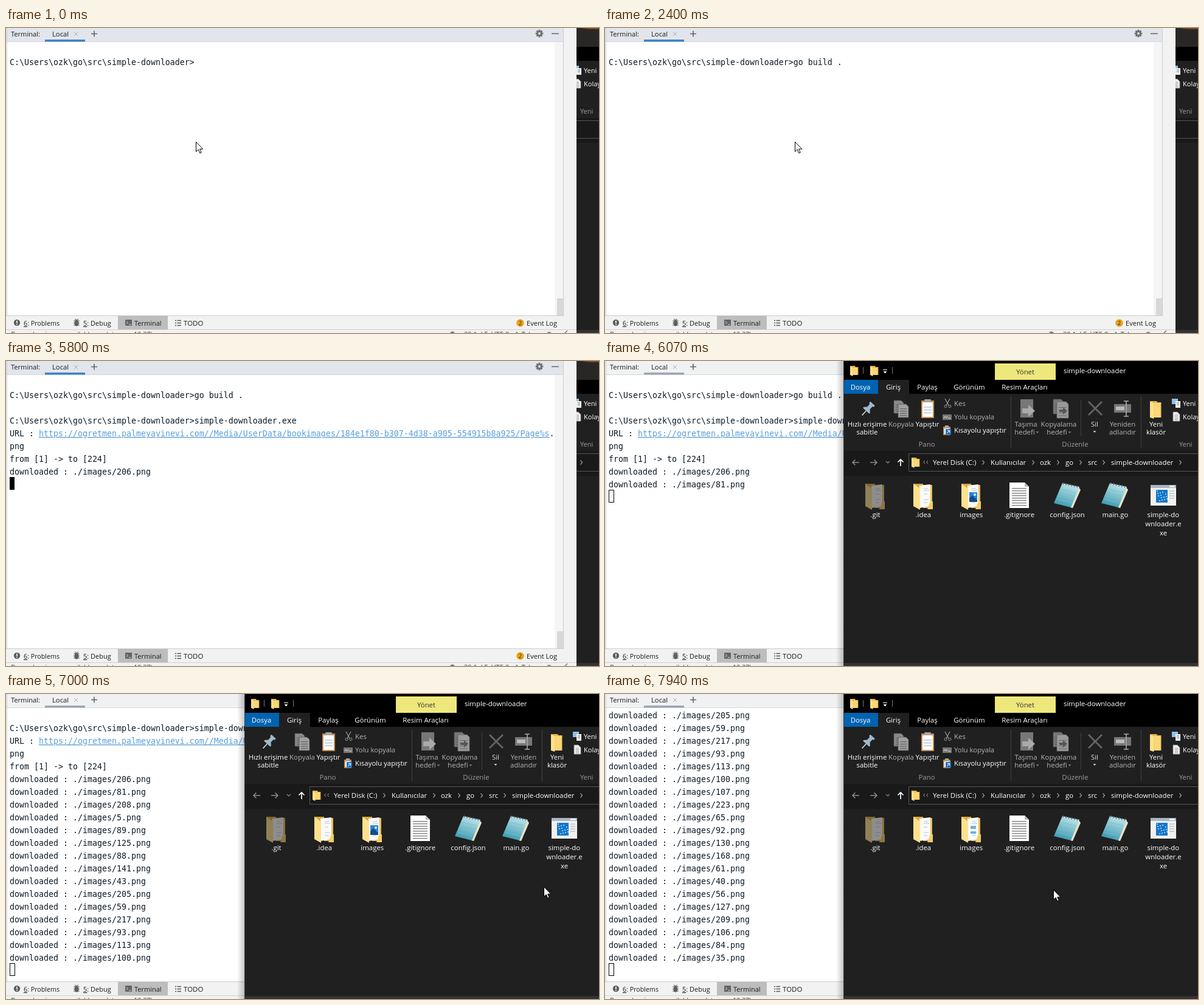
Write an HTML page that moves like this. It is 975 by 502 pixels and loops after 8000 ms.

```html
<!DOCTYPE html>
<html lang="tr">
<head>
<meta charset="utf-8">
<title>Terminal</title>
<style>
html, body { margin: 0; width: 100%; height: 100%; overflow: hidden; background: #fff; }
svg { display: block; width: 975px; height: 502px; }
text { font-family: "Open Sans", "Noto Sans", sans-serif; white-space: pre; }
.term text { font: 13.29px "DejaVu Sans Mono", "Noto Sans Mono", monospace; font-variant-ligatures: none; fill: #0c1b28; }
.link { fill: #5a9fd8; text-decoration: underline; }
.u { text-decoration: underline; }
</style>
</head>
<body>
<svg id="stage" viewBox="0 0 975 502" xmlns="http://www.w3.org/2000/svg"></svg>
<script>
const LOOP = 8000, TICK = 200 / 3, SLACK = 8;
const ROWS = 21, ROW_H = 21, COL_W = 8, TOP = 23, LEFT = 6;
const USER = 'ozk';
const PROMPT = `C:\\Users\\${USER}\\go\\src\\simple-downloader>`;
const LINK = 'https://ogretmen.palmeyayinevi.com//Media/UserData/bookimages/184e1f80-b307-4d38-a905-554915b8a925/Page%s';
const BUILD = 'go build .', RUN = 'simple-downloader.exe';
const IMAGES = [206, 81, 208, 5, 89, 125, 88, 141, 43, 205, 59, 217, 93, 113, 100, 107, 223, 65, 92, 130,
  168, 61, 40, 56, 127, 209, 106, 84, 35];

// Step tables: [time, value]
const BUILD_KEYS = [[0, 0], [70, 1], [140, 2], [200, 4], [270, 5], [400, 6], [800, 7], [1070, 8], [1200, 9], [1270, 10]];
const RUN_KEYS = [[0, 0], [3800, 1], [3870, 2], [4200, 3], [4340, RUN.length]];
const BLINK = [[0, 0], [70, 1], [2400, 0], [2600, 1], [3600, 0], [3800, 1]];
// Linear tables: [time, ...values]
const COUNT = [[6000, 1], [6670, 12], [7400, 20], [7940, 29]];
const POINTER = [[5200, 312, 187], [5400, 514, 215], [5800, 990, 270], [6070, 990, 278],
  [6670, 933, 302], [7400, 827, 335], [7940, 737, 322]];
const RAISE = 6070;

const rect = (x, y, w, h, fill, extra = '') => `<rect x="${x}" y="${y}" width="${w}" height="${h}" fill="${fill}" ${extra}/>`;
const path = (d, fill, extra = '') => `<path d="${d}" fill="${fill}" ${extra}/>`;
const line = (d, stroke, w = 1, extra = '') => path(d, 'none', `stroke="${stroke}" stroke-width="${w}" ${extra}`);
const dot = (x, y, r, fill) => `<circle cx="${x}" cy="${y}" r="${r}" fill="${fill}"/>`;
const label = (x, y, str, fill = '#fff', size = 11.4, anchor = 'start') =>
  `<text x="${x}" y="${y}" fill="${fill}" font-size="${size}" text-anchor="${anchor}">${str}</text>`;
const mid = (x, y, str, fill = '#fff', size = 11.4) => label(x, y, str, fill, size, 'middle');
const at = (x, y, body, extra = '') => `<g transform="translate(${x} ${y})" ${extra}>${body}</g>`;

const DEFS = `<defs>
  <linearGradient id="shade"><stop offset="0" stop-opacity="0"/><stop offset="1" stop-opacity=".22"/></linearGradient>
  <linearGradient id="cover" x1=".7" y1="0" x2=".3" y2="1"><stop offset="0" stop-color="#c4e9ee"/><stop offset="1" stop-color="#3597ae"/></linearGradient>
</defs>`;

function ide() {
  const gear = Array.from({ length: 8 }, (_, i) => rect(-1.4, -6.3, 2.8, 4, '#6e6e6e', `transform="rotate(${i * 45})"`)).join('');
  const list = [481.5, 485.5, 489.5].map(y => line(`M278 ${y}h2M281.5 ${y}h6.5`, '#555', 1.5)).join('');
  const ink = '#1a1a1a';
  return rect(0, 0, 938, 502, '#f2f2f2')
    + '<rect id="head" x="0" y="0" width="917" height="23"/>' + rect(0, 22, 917, 1, '#d2d5d9')
    + rect(2, 23, 900, 450, '#fff') + rect(902, 23, 14, 450, '#f5f5f5')
    + rect(1, 0, 1, 473, '#cfcfcf') + rect(916, 0, 1, 473, '#cdcdcd') + rect(906, 445, 10, 28, '#d8d8d8')
    + label(8, 14, 'Terminal:', ink, 11.1) + label(76, 14, 'Local', ink, 11.3)
    + line('M112 7l6 6m0-6l-6 6', '#a9adb2') + line('M140 9.5h10M145 4.5v10', '#626669', 1.6)
    + at(877, 9, gear + dot(0, 0, 4.6, '#6e6e6e') + dot(0, 0, 2, '#e2e6ec')) + rect(897, 8.5, 12, 1.6, '#6e6e6e')
    + '<rect id="tab" x="64" y="19" width="66" height="3.5"/>'
    + rect(0, 473, 917, 1, '#cbcbcb') + rect(184, 474, 82, 22, '#bdbdbd') + rect(0, 496, 938, 1, '#d0d0d0')
    + dot(18, 485, 5.2, '#5f5f5f') + rect(17.2, 481.6, 1.6, 4.4, '#fff') + rect(17.2, 487, 1.6, 1.6, '#fff')
    + label(29, 490, '<tspan class="u">6</tspan>: Problems', ink, 10.7)
    + line('M111 482h10M111 485.5h10M111 489h10M113 479l6 3m0-3l-6 3', '#5f5f5f', 1.2)
    + '<ellipse cx="116" cy="486" rx="3.5" ry="4.8" fill="#5f5f5f"/>'
    + label(127, 490, '<tspan class="u">5</tspan>: Debug', ink, 11)
    + rect(196, 480, 11, 10, '#606468') + line('M198 482.5l2.5 2.5l-2.5 2.5M202 488h3.5', '#ddd')
    + label(211, 490, 'Terminal', ink, 11) + list + label(292, 490, 'TODO', ink, 11.5)
    + dot(845.5, 485.5, 6.2, '#e9a21b') + mid(845.5, 489, '2', '#3b2a00', 9.5) + label(856, 490, 'Event Log', ink, 11.1)
    + label(8, 508, 'Dependencies are available: update now 19:37)', '#444', 10.6)
    + dot(734, 504, 4.5, '#777') + label(753, 508, '39:1&#160; LF&#160; UTF-8&#160;&#160; 4&#160; Tab', '#444', 11)
    + dot(893, 504, 4, '#888') + line('M918 503l5-5', '#777', 1.4);
}

const smallFolder = (x, y, w = 14, h = 15) => at(x, y,
  path(`M0 0h${w * .55}l1.5 2h${w * .3}v${h - 2}h${-w * .85 - 1.5}z`, '#e6b84c')
  + path(`M0 1l${w * .32} 2v${h - 1}l${-w * .32} -2z`, '#ffe08a') + rect(w * .32, 3, w * .55, h - 3, '#f9d777'));
const sheet = (x, y, w, h, fill, ink) => at(x, y, path(`M0 0h${w - 4}l4 4v${h - 4}H0z`, fill, `stroke="${ink}" stroke-width=".8"`)
  + [.35, .52, .69, .85].map(k => line(`M3 ${h * k}h${w - 6}`, ink)).join(''));
const clipboard = (x, y, w, h) => at(x, y, rect(0, 2, w, h - 2, '#c99052', 'rx="1"') + rect(2, 5, w - 4, h - 7, '#fff')
  + rect(w * .25, 0, w * .5, 5, '#a5a5a5') + [.4, .55, .7].map(k => rect(4, h * k, w - 8, 1, '#9ab')).join(''));
const chevron = (x, y = 167, c = '#9a9a9a') => line(`M${x - 1.5} ${y - 3.5}l3 3.5l-3 3.5`, c, 1.2);
const drop = (x, y, c = '#777') => path(`M${x - 2.5} ${y - 1}h5l-2.5 3z`, c);

function bigFolder(x, extra, id = '') {
  const pic = id && rect(15, 16, 9, 5, '#6fb0e6') + rect(15, 25, 9, 4, '#6fb0e6') + `<g id="${id}">`
    + rect(13, 15, 13, 16, '#2586d8') + path('M13 25l5-5l8 8v3H13z', '#184b86') + dot(22, 19, 2, '#d8ecff') + '</g>';
  return at(x, 201, path('M0 1h16v36H0z', '#dba93e') + path('M16 3h15v38H16z', '#e9bd55')
    + path('M10 4l18-2v36l-18 3z', '#fafafa') + line('M17 9h7M17 12h9M17 18h6M17 27h8M17 32h6', '#b7c3d3')
    + pic + path('M0 1l11 8v35l-11-6z', '#ffe18d') + path('M28 30h4v13h-9z', '#f5cd67'), extra);
}

const notebook = x => at(x, 200, path('M41 8l3 4l-13 30l-4-1z', '#e8e2c8') + path('M14 1l28 6l-14 34l-28-7z', 'url(#cover)')
  + [0, 1, 2, 3].map(i => line(`M${12 - i * 2.3} ${11 + i * 5.6}l24 5.5`, '#7fbccb', .8)).join('')
  + [0, 1, 2, 3, 4, 5].map(i => line(`M${16 + i * 4.6} ${i}l-1 3.5`, '#666', 1.3)).join(''));

function files() {
  const names = ['.git', '.idea', 'images', '.gitignore', 'config.json', 'main.go', 'simple-do'];
  const specks = Array.from({ length: 14 }, (_, i) => dot(7 + (i * 7) % 17, 10 + (i * 11) % 17, .9, '#cfe8ff')).join('');
  const exe = at(897, 204, rect(0, 0, 42, 34, '#f1f1f1') + rect(0, 0, 42, 5, '#a9b7c4') + rect(31, 1.5, 9, 2, '#fff')
    + at(4, 0, rect(5, 8, 19, 21, '#1477c8') + specks) + line('M31 10h8M31 14h8M31 18h8M31 22h8', '#aaa'));
  return names.map((n, i) => mid(444.5 + i * 78.9, 257, n)).join('') + mid(918, 272, 'wnloader.e') + mid(918, 287, 'xe')
    + bigFolder(428, 'opacity=".5"') + bigFolder(507, '') + bigFolder(586, '', 'thumb')
    + at(665, 200, path('M0 0h25l7 7v35H0z', '#fff') + path('M25 0v7h7z', '#bbb')
      + [9, 13, 17, 21, 25, 29, 33, 37].map(y => rect(4, y, 24, 1.3, '#777')).join(''))
    + notebook(738) + notebook(816) + exe;
}

function ribbon() {
  const grey = '#9d9d9d', soft = '#b4b4b4';
  const pin = at(432, 79, '<g transform="rotate(42)">' + path('M-5 -12h10v3l-2 1v6l4 4v2H-7v-2l4-4v-6l-2-1z', '#9fb9cc')
    + rect(-.8, 4, 1.6, 10, '#d8d8d8') + '</g>');
  return pin + mid(431, 108, 'Hızlı erişime') + mid(431, 121, 'sabitle')
    + sheet(475, 65, 16, 21, '#8a8a8a', '#555') + sheet(482, 71, 17, 22, '#a0a0a0', '#555') + mid(487, 108, 'Kopyala', soft)
    + clipboard(520, 63, 21, 31) + mid(530, 108, 'Yapıştır')
    + line('M559 62l6 11M567 62l-6 11', grey, 1.2) + line('M558 75a2 2 0 1 0 4-1a2 2 0 1 0-4 1M565 75a2 2 0 1 0 4-1a2 2 0 1 0-4 1', grey)
    + label(574, 74, 'Kes', soft) + rect(555, 88, 15, 9, '#777') + line('M557 94l2-3l2 3l2-3M564 94h4', '#ddd') + label(574, 96, 'Yolu kopyala', soft)
    + clipboard(556, 106, 12, 16) + rect(560, 112, 9, 9, '#1d70c4') + line('M562 119l4.5-4.5M563 114.5h3.5v3.5', '#fff')
    + label(574, 118, 'Kısayolu yapıştır') + mid(529, 141, 'Pano', grey)
    + rect(683, 63, 21, 30, '#777') + path('M686 78h10v-6l11 10l-11 10v-6h-10z', '#aaa')
    + mid(692, 108, 'Taşıma', soft) + mid(690, 121, 'hedefi', soft) + drop(711, 117)
    + sheet(737, 63, 17, 24, '#777', '#555') + sheet(743, 67, 19, 27, '#999', '#666') + path('M747 80h6v-4l7 6l-7 6v-4h-6z', '#555')
    + mid(746, 108, 'Kopyalama', soft) + mid(743, 121, 'hedefi', soft) + drop(764, 117)
    + line('M795 67l22 22m0-22l-22 22', '#666', 2.6) + mid(805, 108, 'Sil', '#ddd') + drop(805, 116, '#ccc')
    + rect(837, 71, 28, 14, '#777') + rect(840, 75, 14, 6, '#bbb') + line('M853 66h8M853 91h8M857 66v25', '#aaa', 1.6)
    + mid(851, 108, 'Yeniden', soft) + mid(851, 121, 'adlandır', soft) + mid(773, 141, 'Düzenle', grey)
    + smallFolder(896, 66, 20, 27) + mid(906, 108, 'Yeni') + mid(906, 121, 'klasör')
    + rect(932, 62, 10, 9, '#8ec2e6') + rect(938, 66, 8, 11, '#eee') + line('M940 69h4M940 72h4', '#777')
    + sheet(934, 84, 11, 15, '#eee', '#999') + label(950, 74, 'Yeni öğe', '#fff', 11) + label(950, 96, 'Kolay erişim', '#fff', 11)
    + label(944, 141, 'Yeni', grey, 11)
    + line('M667.5 58v85M881.5 58v85M782.5 64v60', '#414141');
}

function explorer() {
  const crumbs = [[539, 'Yerel Disk (C:)'], [634, 'Kullanıcılar'], [715, USER], [757, 'go'], [794, 'src'], [832, 'simple-downloader']];
  return rect(380, 0, 12, 502, 'url(#shade)') + rect(392, 0, 583, 502, '#202020')
    + '<rect id="title" x="392" y="0" width="583" height="31"/>'
    + rect(392, 31, 583, 23, '#000') + rect(392, 54, 583, 94, '#202020') + rect(392, 148, 583, 41, '#191919')
    + '<path id="glow" d="M946 0H975V2Q958 3 946 0Z" fill="#7a4526"/>'
    + smallFolder(403, 8) + smallFolder(436, 8) + line('M424.5 10v11M472.5 10v11', '#777')
    + line('M457 14.5h7', '#fff') + path('M457.5 17h6l-3 3.5z', '#fff')
    + rect(641, 4, 100, 27, '#eee87c') + mid(691, 22, 'Yönet', '#333') + label(754, 20, 'simple-downloader')
    + rect(393, 31, 56, 23, '#0063b1') + rect(449, 31, 51, 24, '#202020')
    + [[420, 'Dosya'], [474, 'Giriş'], [530, 'Paylaş'], [599, 'Görünüm'], [690, 'Resim Araçları']].map(([x, s]) => mid(x, 47, s)).join('')
    + ribbon()
    + line('M418 167h-11m4.5-4.5l-4.5 4.5l4.5 4.5M436 167h11m-4.5-4.5l4.5 4.5l-4.5 4.5', '#8a8a8a', 1.5)
    + line('M462 165l3 3l3-3', '#8a8a8a', 1.2) + line('M486 173v-11m-4.5 4.5l4.5-4.5l4.5 4.5', '#fff', 1.7)
    + line('M976 152.5H499.5V181.5H976', '#565656')
    + smallFolder(504, 159) + line('M526 164l-2.5 2.5l2.5 2.5M531 164l-2.5 2.5l2.5 2.5', '#aaa')
    + crumbs.map(([x, s]) => label(x, 171, s)).join('') + [622, 704, 745, 782, 820].map(x => chevron(x)).join('')
    + `<g id="arrow">${chevron(946)}</g><g id="files">${files()}</g>`
    + rect(392, 497, 583, 5, '#333') + rect(392, 0, 1, 502, '#3a3a3a');
}

const svg = document.getElementById('stage');
const rowTexts = Array.from({ length: ROWS }, (_, i) => `<text x="${LEFT}" y="${TOP + 17 + i * ROW_H}"></text>`).join('');
svg.innerHTML = DEFS
  + `<g id="ide">${ide()}<g class="term">${rowTexts}</g><rect id="caret"/></g><g id="explorer">${explorer()}</g>`
  + '<path id="pointer" d="M.5 .5V16.5L4.2 13L6.8 19L9.2 18L6.7 12.2H11.8Z" fill="#fff" stroke="#000"/>';
const $ = id => document.getElementById(id);
const rows = [...svg.querySelectorAll('.term text')];
const set = (el, attrs) => Object.entries(attrs).forEach(([k, v]) => el.setAttribute(k, v));

const step = (keys, t) => keys.reduce((v, k) => t >= k[0] ? k[1] : v, 0);
function lerp(keys, t) {
  if (t <= keys[0][0]) return keys[0].slice(1);
  const i = keys.findIndex(k => k[0] >= t);
  if (i < 0) return keys[keys.length - 1].slice(1);
  const a = keys[i - 1], b = keys[i], k = (t - a[0]) / (b[0] - a[0]);
  return a.slice(1).map((v, n) => v + (b[n + 1] - v) * k);
}

// Finished and current terminal lines; the caret sits after the last one.
function buffer(t) {
  const out = ['', PROMPT + BUILD.slice(0, step(BUILD_KEYS, t))];
  if (t >= 1400) out.push('');
  if (t >= 2600) out.push(PROMPT + RUN.slice(0, step(RUN_KEYS, t)));
  if (t >= 4940) out.push(`URL : ${LINK}.`, 'png', 'from [1] -> to [224]');
  if (t >= 5270) {
    const n = Math.floor(lerp(COUNT, t)[0]);
    out.push(...IMAGES.slice(0, n).map(i => `downloaded : ./images/${i}.png`));
  }
  if (t >= 4800) out.push('');
  return out;
}

const markup = s => s.replace(/>/g, '&gt;').replace(LINK, `<tspan class="link">${LINK}</tspan>`);
let order = null;

function draw(ms) {
  // Key times are rounded to 10 ms, so each tick reads slightly late.
  const t = Math.floor((ms + SLACK) / TICK) * TICK + SLACK;
  const front = t >= RAISE;
  const view = buffer(t).slice(-ROWS);
  rows.forEach((el, i) => {
    const s = view[i] || '';
    if (el.dataset.s !== s) { el.dataset.s = s; el.innerHTML = markup(s); }
  });
  const x = LEFT + view[view.length - 1].length * COL_W, y = TOP + (view.length - 1) * ROW_H;
  set($('caret'), front
    ? { x: x + .5, y: y + .5, width: 8, height: 20, fill: 'none', stroke: '#000', opacity: 1 }
    : { x, y, width: 8, height: 21, fill: '#000', stroke: 'none', opacity: step(BLINK, t) });
  set($('head'), { fill: front ? '#f0f1f2' : '#e2e6ec' });
  set($('tab'), { fill: front ? '#9ca7b3' : '#4083c9' });
  set($('title'), { fill: front ? '#000' : '#292725' });
  set($('glow'), { opacity: front ? 0 : 1 });
  set($('files'), { opacity: front ? 1 : 0 });
  set($('arrow'), { opacity: t >= 3800 ? 1 : 0 });
  set($('thumb'), { opacity: t < 7670 ? 1 : 0 });
  const [px, py] = lerp(POINTER, t).map(Math.round);
  set($('pointer'), { transform: `translate(${px} ${py})` });
  if (order !== front) {
    order = front;
    svg.insertBefore(front ? $('explorer') : $('ide'), $('pointer'));
  }
}

const start = performance.now();
function loop() {
  draw((performance.now() - start) % LOOP);
  requestAnimationFrame(loop);
}
loop();
</script>
</body>
</html>
```
